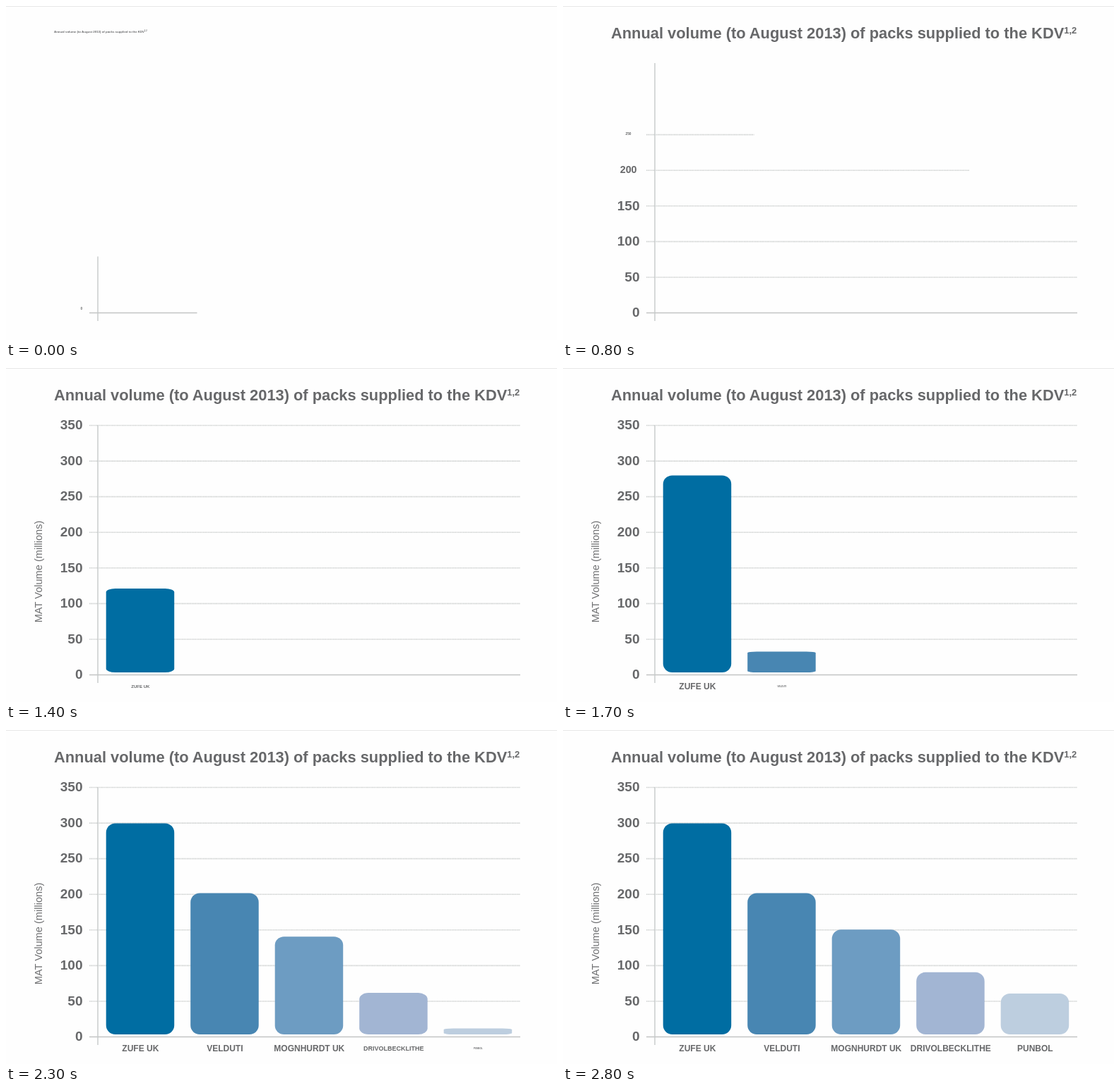
Animation, 780 px wide and 474 px high, one loop 2900 ms. Source, as an HTML page:

```html
<!DOCTYPE html>
<html lang="en">
<head>
<meta charset="utf-8">
<title>Annual pack volume</title>
<style>
  html, body { margin: 0; width: 100%; height: 100%; overflow: hidden; background: #fefefe; }
  svg { display: block; width: 780px; height: 474px; }
  text { font-family: "Liberation Sans", Arial, Helvetica, sans-serif; font-weight: bold; fill: #67686a; }
</style>
</head>
<body>
<svg id="stage" viewBox="0 0 780 474"></svg>
<script>
const LOOP = 2900, STEP = 100;
const LEFT = 118, RIGHT = 728, BASE = 435.5, ROW = 50.57;
const stage = document.getElementById('stage');
const parts = [];

function el(name, attrs, parent = stage) {
  const node = document.createElementNS('http://www.w3.org/2000/svg', name);
  for (const key in attrs) node.setAttribute(key, attrs[key]);
  parent.appendChild(node);
  return node;
}

// Registers a part: draw(k) gets the count of steps since its start.
function part(node, start, draw) {
  parts.push({ node, start, draw });
}

// Text that grows around the point (x, y) in equal steps.
function growText(str, x, y, start, attrs, steps = 4, turn = 0) {
  const g = el('g', {});
  const t = el('text', attrs, g);
  t.textContent = str;
  part(g, start, k => {
    const s = Math.min(1, k / steps);
    g.setAttribute('transform', `translate(${x} ${y}) rotate(${turn}) scale(${s})`);
  });
  return t;
}

function growLine(attrs, end, from, to, start) {
  const line = el('line', attrs);
  part(line, start, k => line.setAttribute(end, from + (to - from) * Math.min(1, k / 4)));
}

el('rect', { width: 780, height: 1, fill: '#e8e8e8' });

// Grid and vertical scale
const rowStart = [0, 100, 200, 400, 600, 800, 1000, 1100];
rowStart.forEach((start, i) => {
  const y = BASE - i * ROW;
  const style = i
    ? { stroke: '#cdd0cf', 'stroke-width': 1.6, 'stroke-dasharray': '1.5 0.8' }
    : { stroke: '#c2c3c3', 'stroke-width': 1.5 };
  growLine({ x1: LEFT, y1: y, y2: y, ...style }, 'x2', LEFT, RIGHT, start);
  if (i) {
    growText(String(i * 50), 92.5, y - 1, start,
      { x: 16, y: 6.8, 'font-size': 19, 'text-anchor': 'end' });
  } else {
    growText('0', 108, 428, start,
      { x: 0.5, y: 13.4, 'font-size': 19, 'text-anchor': 'end' });
  }
});
growLine({ x1: 130, x2: 130, y1: 447, stroke: '#c5c9c9', 'stroke-width': 1.4 }, 'y2', 447, 81, 0);

// Title
const title = growText('Annual volume (to August 2013) of packs supplied to the KDV',
  68, 35.5, 0, { x: 0, y: 10.5, 'font-size': 21.85 }, 5);
const note = el('tspan', { dy: -7.5, 'font-size': 13 }, title);
note.textContent = '1,2';

growText('MAT Volume (millions)', 46.5, 289, 1100,
  { x: 0, y: 4.5, 'font-size': 14.6, 'text-anchor': 'middle', style: 'font-weight:normal;fill:#6f7072' }, 4, -90);

// Bars
const rise = [0, 0.147, 0.397, 0.668, 0.81, 0.933, 1];
const bars = [
  ['ZUFE UK', 299.5, '#006da2', 1300],
  ['VELDUTI', 200.5, '#4886b2', 1700],
  ['MOGNHURDT UK', 148.8, '#6d9cc2', 1900],
  ['DRIVOLBECKLITHE', 88.2, '#a2b5d3', 2100],
  ['PUNBOL', 58, '#bdcedf', 2300]
];
bars.forEach(([name, height, fill, start], i) => {
  const x = 141.7 + i * 119.5;
  const bar = el('rect', { x, width: 96.5, rx: 13, fill });
  part(bar, start, k => {
    const s = rise[Math.min(k, 6)], h = height * s;
    bar.setAttribute('y', 432 - h);
    bar.setAttribute('height', h);
    bar.setAttribute('ry', 13 * s);
  });
  growText(name, x + 48.6, 452.3, start,
    { x: 0, y: 4, 'font-size': 12, 'text-anchor': 'middle' });
});

function render(ms) {
  const now = Math.floor(ms % LOOP / STEP) * STEP;
  for (const p of parts) {
    const k = (now - p.start) / STEP + 1;
    p.node.style.display = k > 0 ? '' : 'none';
    if (k > 0) p.draw(k);
  }
}

let origin = null;
function tick(time) {
  if (origin === null) origin = time;
  render(time - origin);
  requestAnimationFrame(tick);
}
render(0);
requestAnimationFrame(tick);
</script>
</body>
</html>
```
